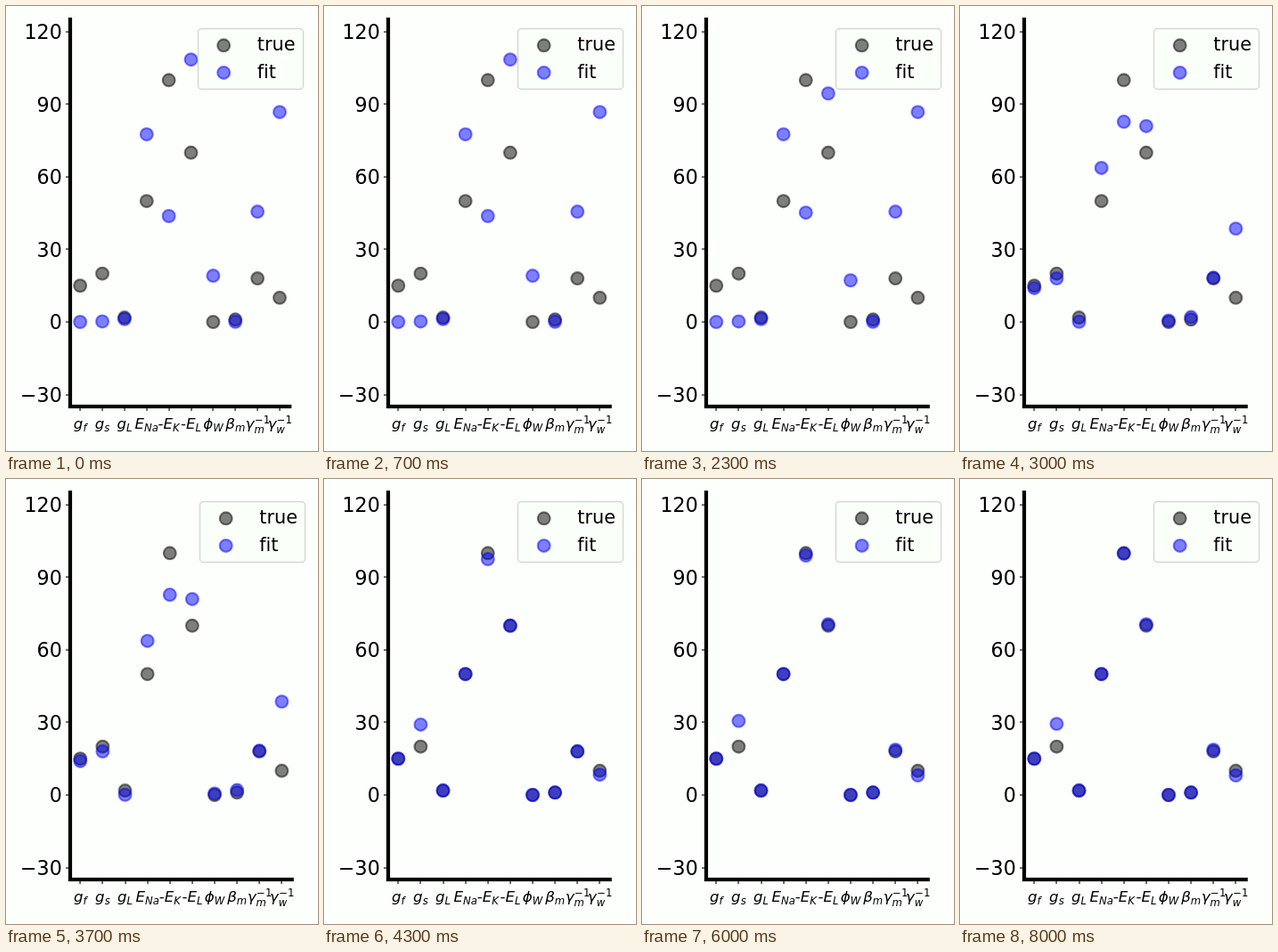
These frames come from a looping animation (350 px wide and 500 px high, 8.3 s). An HTML page with a canvas:

```html
<!DOCTYPE html>
<html lang="en">
<head>
<meta charset="utf-8">
<style>
html, body { margin: 0; width: 100%; height: 100%; overflow: hidden; background: #fcfffb; }
canvas { display: block; width: 350px; height: 500px; }
</style>
</head>
<body>
<canvas></canvas>
<script>
const LOOP = 8300, LEFT = 72, BASE = 450, UNIT = 2.717;
const PAPER = '#fcfffb', BLACK = 'rgba(0,0,0,.5)', BLUE = 'rgba(0,0,255,.5)';

// Prefix, symbol, subscript, superscript
const labels = [
  ['', 'g', 'f'], ['', 'g', 's'], ['', 'g', 'L'], ['', 'E', 'Na'], ['-', 'E', 'K'],
  ['-', 'E', 'L'], ['', 'ϕ', 'W'], ['', 'β', 'm'], ['', 'γ', 'm', '−1'], ['', 'γ', 'w', '−1']
];
const truth = [15, 20, 1.8, 50, 100, 70, 0, 1, 18, 10];
const guess = [0, .2, 1.2, 77.6, 43.8, 108.5, 19.1, .1, 45.6, 86.8];
const middle = [14, 18, .1, 63.7, 82.8, 81, .6, 2, 18.3, 38.6];

// Each pose changes some values of the one before; the fit settles near the truth.
const poses = [];
function pose(step, change) {
  poses.push({ step, values: Object.assign([], poses.at(-1)?.values, change) });
}
pose(3, guess);
pose(7, { 4: 45.2, 5: 94.5, 6: 17.2 });
pose(9, middle);
pose(11, {});
pose(13, { ...truth, 1: 29.1, 4: 97.5, 9: 8.4 });
pose(18, { 1: 30.6, 4: 99, 5: 70.6, 8: 18.7, 9: 8.1 });
pose(24, { 1: 29.4, 4: 99.8 });

const canvas = document.querySelector('canvas');
const ctx = canvas.getContext('2d');
const ratio = window.devicePixelRatio || 1;
canvas.width = 350 * ratio;
canvas.height = 500 * ratio;

const yOf = v => 355 - v * UNIT;

// Three steps a second, with start times rounded to tenths
function stepAt(t) {
  let n = 0;
  while (Math.round((n + 1) * 10 / 3) * 100 <= t) n++;
  return n;
}

function fitAt(step) {
  const next = poses.findIndex(p => p.step >= step);
  const b = poses[next], a = poses[Math.max(0, next - 1)];
  const u = a === b ? 0 : (step - a.step) / (b.step - a.step);
  const eased = u * u * (3 - 2 * u);
  return a.values.map((v, i) => v + (b.values[i] - v) * eased);
}

function setFont(size, style = '') {
  ctx.font = `${style} ${size}px "DejaVu Sans", sans-serif`;
  ctx.letterSpacing = '.01px'; // keeps "fi" from joining
}

function widthOf(s, size, style) {
  setFont(size, style);
  return ctx.measureText(s).width;
}

function text(s, x, y, size, align = 'left', style = '') {
  const width = widthOf(s, size, style);
  ctx.textAlign = align;
  ctx.fillStyle = '#000';
  ctx.fillText(s, x, y);
  return width;
}

function dot(x, y, color) {
  ctx.beginPath();
  ctx.arc(x, y, 6.95, 0, 7);
  ctx.fillStyle = ctx.strokeStyle = color;
  ctx.lineWidth = 2.08;
  ctx.fill();
  ctx.stroke();
}

function mathLabel([prefix, symbol, sub, sup = ''], x) {
  const big = 16.67, small = 11.67, it = 'italic';
  const scripts = Math.max(widthOf(sub, small, it), widthOf(sup, small));
  x -= (widthOf(prefix, big) + widthOf(symbol, big, it) + scripts) / 2;
  x += text(prefix, x, 474.5, big);
  x += text(symbol, x, 474.5, big, 'left', it);
  text(sub, x, sup ? 479.5 : 477.5, small, 'left', it);
  text(sup, x + .5, 469, small);
}

function axes(right, xOf) {
  ctx.fillStyle = '#000';
  ctx.fillRect(LEFT - 2.08, 13, 4.17, BASE - 11);
  ctx.fillRect(LEFT - 2.08, BASE - 2.08, right - LEFT + 4.17, 4.17);
  for (let v = -30; v <= 120; v += 30) {
    ctx.fillRect(67, Math.round(yOf(v)) - .5, 5, 1.1);
    text(String(v).replace('-', '−'), 62.8, yOf(v) + 8.1, 22.2, 'right');
  }
  labels.forEach((label, i) => {
    ctx.fillStyle = '#000';
    ctx.fillRect(Math.round(xOf(i)) - .5, BASE, 1.1, 5);
    mathLabel(label, xOf(i));
  });
}

function legend(right) {
  ctx.beginPath();
  ctx.roundRect(Math.floor(right - 103) + .5, 25.5, 118, 68, 4);
  ctx.globalAlpha = .8;
  ctx.fillStyle = PAPER;
  ctx.strokeStyle = '#ccc';
  ctx.lineWidth = 1.39;
  ctx.fill();
  ctx.stroke();
  ctx.globalAlpha = 1;
  [['true', BLACK], ['fit', BLUE]].forEach(([name, color], i) => {
    dot(right - 74, 44.3 + i * 30.6, color);
    text(name, right - 36.5, 50.2 + i * 30.3, 20.83);
  });
}

function draw(t) {
  const step = stepAt(t);
  const width = step < 1 ? 246.2 : 248.7, right = LEFT + width;
  const xOf = i => LEFT + width * (1 / 22 + i / 9.9);

  ctx.setTransform(ratio, 0, 0, ratio, 0, 0);
  ctx.fillStyle = PAPER;
  ctx.fillRect(0, 0, 350, 500);
  truth.forEach((v, i) => dot(xOf(i), yOf(v), BLACK));
  fitAt(step).forEach((v, i) => dot(xOf(i), yOf(v), BLUE));
  axes(right, xOf);
  legend(right);
}

const begin = performance.now();
function tick() {
  draw((performance.now() - begin) % LOOP);
  requestAnimationFrame(tick);
}
tick();
</script>
</body>
</html>
```
